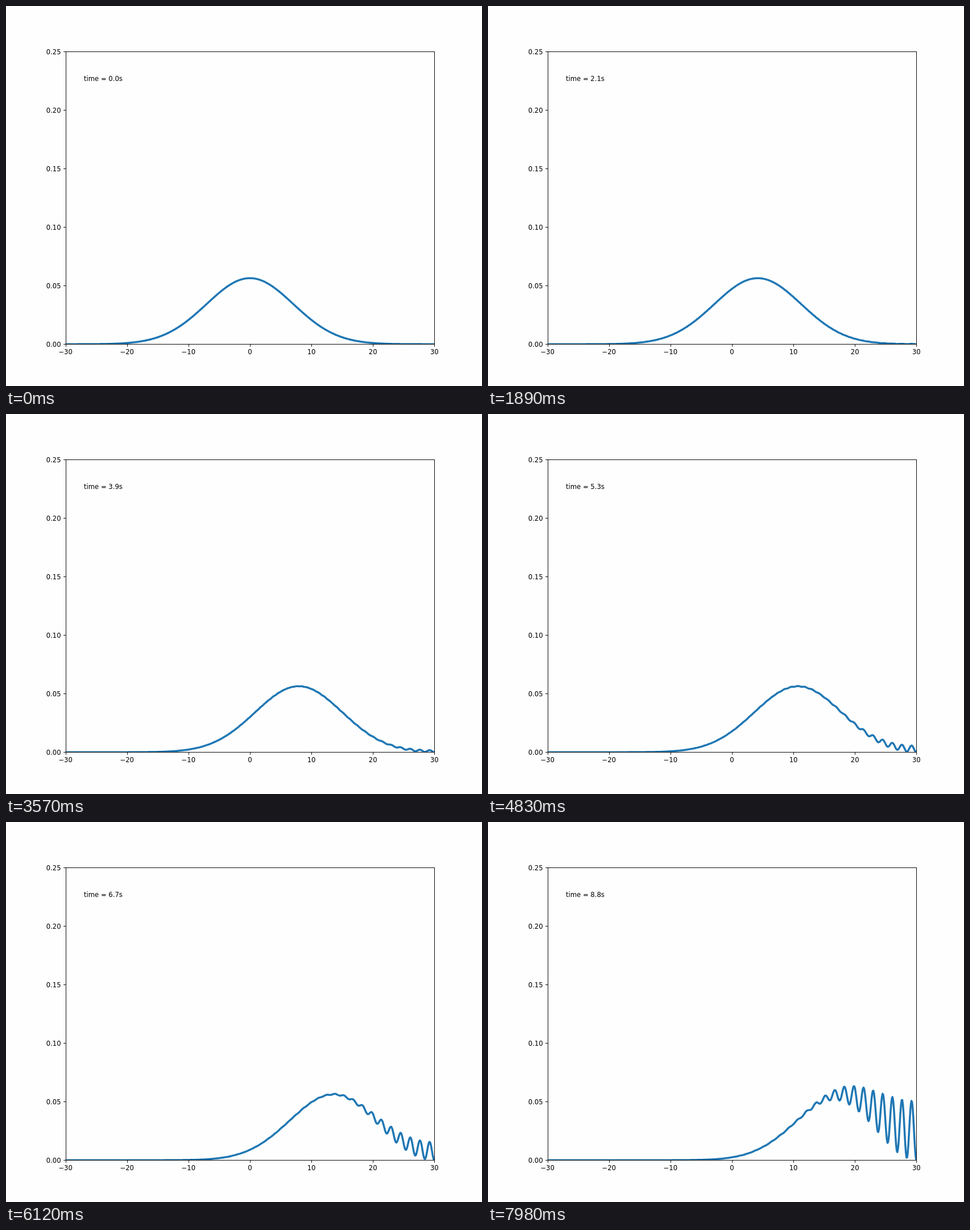
Animation of 837 by 669 pixels, one loop 8000 ms. Source, as an HTML page:

```html
<!DOCTYPE html>
<html lang="en">
<head>
<meta charset="utf-8">
<title>Wave packet at a wall</title>
<style>
  html, body { margin: 0; width: 100%; height: 100%; overflow: hidden; background: #fefefe; }
  svg { display: block; width: 837px; height: 669px; }
  text { font: 11.625px "DejaVu Sans", sans-serif; fill: #000; }
  .axis { stroke: #000; stroke-width: 0.95; fill: none; }
  #curve { stroke: #1f77b4; stroke-width: 3.49; stroke-linejoin: round; fill: none; }
</style>
</head>
<body>
<svg viewBox="0 0 837 669">
  <clipPath id="plot"><rect x="105" y="80" width="648.5" height="515.5"/></clipPath>
  <path id="curve" clip-path="url(#plot)"/>
  <rect class="axis" x="105.5" y="80.5" width="648" height="515"/>
  <g id="ticks"></g>
  <text id="clock" x="137" y="132"></text>
</svg>
<script>
const LOOP = 8000, STEP = 30;
const WALL = 30, CELLS = 600, MODES = 240;
const SIGMA = 10, K0 = 2;
const px = x => 428.97 + x * 10.811;
const py = y => 595.41 - y * 2060.5;
const $ = id => document.getElementById(id);

function add(tag, attrs, text = "") {
  const el = document.createElementNS("http://www.w3.org/2000/svg", tag);
  for (const key in attrs) el.setAttribute(key, attrs[key]);
  el.textContent = text;
  $("ticks").append(el);
}

for (let x = -30; x <= 30; x += 10) {
  const at = Math.floor(px(x) + 0.5) + 0.5;
  add("path", { class: "axis", d: `M${at} 595.5v4.4` });
  add("text", { x: px(x), y: 612.7, "text-anchor": "middle" }, String(x).replace("-", "\u2212"));
}
for (let i = 0; i <= 5; i++) {
  const at = Math.floor(py(i / 20) + 0.5) + 0.5;
  add("path", { class: "axis", d: `M105.5 ${at}h-4.4` });
  add("text", { x: 96.6, y: at + 4.2, "text-anchor": "end" }, (i / 20).toFixed(2));
}

// Expand the Gaussian packet in the sine modes of the box.
const gridX = j => -WALL + 2 * WALL * j / CELLS;
const sine = Float64Array.from({ length: 2 * CELLS }, (_, j) => Math.sin(Math.PI * j / CELLS));
const norm = 1 / Math.sqrt(SIGMA * Math.sqrt(Math.PI));
const modes = [];
for (let n = 1; n <= MODES; n++) {
  let re = 0, im = 0;
  for (let j = 1; j < CELLS; j++) {
    const x = gridX(j);
    const a = norm * Math.exp(-x * x / (2 * SIGMA * SIGMA)) * sine[n * j % (2 * CELLS)];
    re += a * Math.cos(K0 * x);
    im += a * Math.sin(K0 * x);
  }
  const k = n * Math.PI / (2 * WALL);
  modes.push({ re: re * 2 / CELLS, im: im * 2 / CELLS, energy: k * k / 2 });
}

function density(t) {
  const re = new Float64Array(CELLS + 1), im = new Float64Array(CELLS + 1);
  modes.forEach((m, i) => {
    const c = Math.cos(m.energy * t), s = Math.sin(m.energy * t);
    const a = m.re * c + m.im * s, b = m.im * c - m.re * s;
    for (let j = 0, p = 0; j <= CELLS; j++) {
      re[j] += a * sine[p];
      im[j] += b * sine[p];
      p = (p + i + 1) % (2 * CELLS);
    }
  });
  return re.map((v, j) => v * v + im[j] * im[j]);
}

let shown = -1;
function draw(ms) {
  const step = Math.floor(ms % LOOP / STEP);
  if (step === shown) return;
  shown = step;
  const points = Array.from(density(step / 30), (v, j) => px(gridX(j)).toFixed(2) + " " + py(v).toFixed(2));
  $("curve").setAttribute("d", "M" + points.join("L"));
  $("clock").textContent = `time = ${(step * 0.033).toFixed(1)}s`;
}

const start = performance.now();
function tick() {
  draw(performance.now() - start);
  requestAnimationFrame(tick);
}
tick();
</script>
</body>
</html>
```
